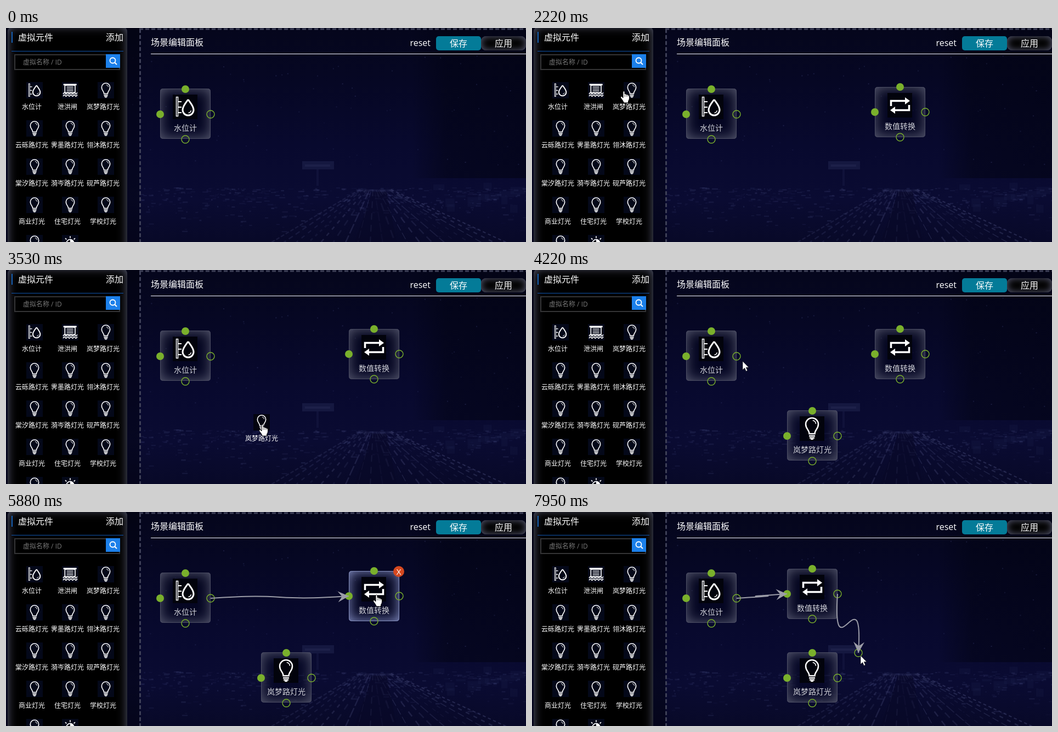
Write an HTML page with a canvas that moves like this. It is 948x392 px and loops after 8000 ms.

```html
<!DOCTYPE html>
<html lang="zh">
<head>
<meta charset="utf-8">
<style>
html, body { margin: 0; width: 100%; height: 100%; overflow: hidden; background: #05061f; }
canvas { display: block; }
</style>
</head>
<body>
<canvas id="stage" width="948" height="392"></canvas>
<script>
const W = 948, H = 392, LOOP = 8000;
const FONT = '"Open Sans", "Noto Sans CJK SC", "Noto Sans CJK", sans-serif';
const GREEN = '#7ab02c', GREY = '#9c9da8';
const screen = document.getElementById('stage').getContext('2d');
const backdrop = document.createElement('canvas');
backdrop.width = W;
backdrop.height = H;
let c = backdrop.getContext('2d');

function rect(x, y, w, h, fill) {
  c.fillStyle = fill;
  c.fillRect(x, y, w, h);
}

function text(s, x, cy, size, fill = '#fff', align = 'left') {
  c.font = `${size}px ${FONT}`;
  c.fillStyle = fill;
  c.textAlign = align;
  c.fillText(s, x, cy + size * 0.37);
}

function line(width, color, ...pts) {
  c.beginPath();
  pts.forEach(([x, y], i) => i ? c.lineTo(x, y) : c.moveTo(x, y));
  c.lineWidth = width;
  c.strokeStyle = color;
  c.stroke();
}

function disc(x, y, r, fill) {
  c.beginPath();
  c.arc(x, y, r, 0, 7);
  c.fillStyle = fill;
  c.fill();
}

function ring(x, y, r, color, width = 1.4) {
  c.beginPath();
  c.arc(x, y, r, 0, 7);
  c.lineWidth = width;
  c.strokeStyle = color;
  c.stroke();
}

function poly(pts, fill) {
  c.beginPath();
  pts.forEach(p => c.lineTo(...p));
  c.closePath();
  c.fillStyle = fill;
  c.fill();
}

// Rounded box with a glow on the inside of its edge
function glowBox(x, y, w, h, r, fill, glow, blur) {
  c.save();
  c.beginPath();
  c.roundRect(x, y, w, h, r);
  c.fillStyle = fill;
  c.fill();
  c.clip();
  c.beginPath();
  c.rect(x - 60, y - 60, w + 120, h + 120);
  c.roundRect(x, y, w, h, r);
  c.shadowColor = glow;
  c.shadowBlur = blur;
  c.fillStyle = glow;
  c.fill('evenodd');
  c.restore();
}

// Icons live on a 45 x 45 grid
const icons = {
  water() {
    c.lineWidth = 1.5;
    c.strokeRect(6.5, 4.5, 3, 35);
    for (const y of [13, 23, 33]) line(2, '#fff', [10, y], [16, y]);
    c.beginPath();
    c.moveTo(28, 9);
    c.bezierCurveTo(32, 15, 38, 21, 38, 28);
    c.arc(28, 28, 10, 0, Math.PI);
    c.bezierCurveTo(18, 21, 24, 15, 28, 9);
    c.lineWidth = 3;
    c.stroke();
    c.beginPath();
    c.arc(28, 28, 5.5, 0.2, 1.5);
    c.lineWidth = 1.5;
    c.stroke();
  },
  gate() {
    rect(4, 5, 36, 4, '#fff');
    c.lineWidth = 2.5;
    c.strokeRect(8, 9, 28, 20);
    for (const y of [14, 19, 24]) line(2, '#fff', [13, y], [31, y]);
    for (const y of [31, 37]) {
      c.beginPath();
      for (let x = 3; x <= 42; x++) c.lineTo(x, y + 2 * Math.sin(x * 0.7));
      c.lineWidth = 2.5;
      c.stroke();
    }
  },
  bulb() {
    c.beginPath();
    c.moveTo(17.5, 32);
    c.bezierCurveTo(17.5, 25, 11, 23, 11, 14.5);
    c.arc(22.5, 14.5, 11.5, Math.PI, 0);
    c.bezierCurveTo(34, 23, 27.5, 25, 27.5, 32);
    c.closePath();
    c.lineWidth = 2.5;
    c.stroke();
    c.beginPath();
    c.arc(22.5, 14.5, 7, -1.4, -0.1);
    c.lineWidth = 1.5;
    c.stroke();
    line(2.5, '#fff', [17, 36], [28, 36]);
    line(2.5, '#fff', [18, 39.5], [27, 39.5]);
    rect(20, 41, 5, 2, '#fff');
  },
  swap() {
    line(3.5, '#fff', [6.5, 24], [6.5, 14.5], [34, 14.5]);
    line(3.5, '#fff', [39.5, 22], [39.5, 31.5], [12, 31.5]);
    poly([[32, 8], [41, 14.5], [32, 21]], '#fff');
    poly([[14, 25], [5, 31.5], [14, 38]], '#fff');
  },
  sun() {
    ring(22.5, 22.5, 10, '#fff', 2.5);
    c.beginPath();
    c.arc(22.5, 22.5, 10, -Math.PI / 2, Math.PI / 2);
    c.fill();
    for (let a = 0; a < 6.2; a += Math.PI / 4) {
      const u = Math.cos(a), v = Math.sin(a);
      line(2.5, '#fff', [22.5 + u * 14, 22.5 + v * 14], [22.5 + u * 19, 22.5 + v * 19]);
    }
  }
};

function icon(name, x, y, size, bg) {
  rect(x, y, size, size, bg);
  c.save();
  c.translate(x, y);
  c.scale(size / 45, size / 45);
  c.strokeStyle = c.fillStyle = '#fff';
  icons[name]();
  c.restore();
}

function drawScene() {
  let seed = 11;
  const rnd = () => (seed = seed * 16807 % 2147483647) / 2147483647;
  const sky = c.createLinearGradient(0, 0, 0, H);
  [[0, '#05061c'], [0.25, '#06072400'.slice(0, 7)], [0.55, '#08092e'], [0.8, '#0a0b32'], [1, '#080928']]
    .forEach(s => sky.addColorStop(...s));
  rect(0, 0, W, H, sky);
  const shade = c.createLinearGradient(740, 0, W, 0);
  shade.addColorStop(0, 'rgba(2,3,18,0)');
  shade.addColorStop(0.3, 'rgba(2,3,18,.5)');
  shade.addColorStop(1, 'rgba(2,3,18,.6)');
  rect(740, 0, 208, 275, shade);
  for (let i = 0; i < 70; i++) {
    rect(230 + rnd() * 718, 50 + rnd() * 200, 2, 2, `rgba(70,75,130,${0.1 + rnd() * 0.25})`);
  }
  rect(540, 244, 58, 15, '#151840');
  rect(545, 250, 46, 4, '#1d2049');
  rect(566, 259, 4, 30, '#10123a');
  // City lights along the horizon
  for (let i = 0; i < 420; i++) {
    const y = 292 + rnd() * rnd() * 95;
    rect(240 + rnd() * 708, y, 2 + rnd() * 9, 1 + rnd() * 2, `rgba(68,74,125,${0.06 + rnd() * 0.2})`);
  }
  // Streets running to the vanishing point
  for (let i = 0; i < 20; i++) {
    const far = 645 + i * 3, near = 480 + i * 23;
    c.setLineDash([5 + rnd() * 14, 3 + rnd() * 8]);
    line(1 + rnd() * 2, `rgba(92,97,145,${0.12 + rnd() * 0.22})`, [far, 296], [near, 395]);
  }
  c.setLineDash([]);
  poly([[668, 300], [694, 300], [712, 392], [636, 392]], 'rgba(8,9,38,.5)');
  for (let i = 0; i < 14; i++) {
    rect(770 + rnd() * 170, 282 + rnd() * 50, 8 + rnd() * 20, 4 + rnd() * 14, 'rgba(45,50,95,.13)');
  }
  rect(0, 0, 243, H, 'rgba(0,0,8,.4)');
}

function drawPanel() {
  glowBox(3, -3, 218, 460, 10, '#000', '#565970', 17);
  rect(10, 7, 2, 20, '#1560b4');
  text('虚拟元件', 22, 17.5, 16);
  text('添加', 182, 17.5, 16);
  rect(10, 42, 204, 1, '#0f55b0');
  c.lineWidth = 2;
  c.strokeStyle = '#343436';
  c.strokeRect(16, 49, 191, 27);
  text('虚拟名称 / ID', 31, 62.5, 12, '#777');
  rect(182, 48, 26, 25, '#1c80ea');
  ring(194.5, 59.5, 5, '#fff', 1.8);
  line(2, '#fff', [198, 63], [202, 67]);

  const labels = ['水位计', '泄洪闸', '岚梦路灯光', '云砾路灯光', '霁墨路灯光', '翎沐路灯光', '棠汐路灯光',
    '漪岑路灯光', '砚芦路灯光', '商业灯光', '住宅灯光', '学校灯光', '', ''];
  const special = { 0: 'water', 1: 'gate', 13: 'sun' };
  labels.forEach((label, i) => {
    const x = 47 + i % 3 * 65, y = 99 + Math.floor(i / 3) * 70;
    icon(special[i] || 'bulb', x - 10, y, 30, '#040819');
    text(label, x, y + 45.5, 12, '#fff', 'center');
  });
}

function drawHeader() {
  c.setLineDash([7, 4]);
  line(3, '#3d3f56', [243, 2], [W, 2]);
  line(3, '#3d3f56', [244.5, 2], [244.5, H]);
  c.setLineDash([]);
  text('场景编辑面板', 264, 26, 16);
  rect(264, 47, 684, 1, '#fff');
  text('reset', 736.5, 27, 16);
  c.beginPath();
  c.roundRect(784, 15, 82, 26, 5);
  c.fillStyle = '#047b98';
  c.fill();
  text('保存', 825, 28.5, 16, '#fff', 'center');
  glowBox(866, 15, 82, 26, 9, '#000', '#5b5d76', 14);
  text('应用', 907, 28.5, 16, '#fff', 'center');
}

function node(x, y, name, label, hover) {
  const top = Math.floor(y), py = Math.round(y);
  glowBox(x, top, 92, 92, 5, 'rgba(2,3,20,.35)', hover ? '#8b95cc' : '#5c5e74', 24);
  c.beginPath();
  c.roundRect(x + 0.5, top + 0.5, 91, 91, 5);
  c.lineWidth = 1;
  c.strokeStyle = hover ? '#8590bd' : '#4b4d62';
  c.stroke();
  icon(name, x + 23, top + 11, 45, '#02030c');
  text(label, x + 46, top + 71.5, 14, '#d3d4da', 'center');
  disc(x + 46, py, 7, GREEN);
  disc(x, py + 46, 7, GREEN);
  ring(x + 92, py + 46, 7, GREEN);
  ring(x + 46, py + 92, 7, GREEN);
  if (hover) {
    disc(x + 91, top + 1, 10, '#d5481f');
    text('X', x + 91, top + 1, 15, '#fff', 'center');
  }
}

// Bezier link with strong handles along its main axis
function link(x0, y0, x1, y1) {
  const dx = x1 - x0, dy = y1 - y0;
  const flat = Math.abs(dx) >= Math.abs(dy);
  const hx = (flat ? 150 : -10) * (dx < 0 ? -1 : 1);
  const hy = flat ? (dy > 0 ? 10 : -10) : 150 * Math.sign(dy);
  const at = (t, a, b, h) => {
    const u = 1 - t;
    return u * u * u * a + 3 * u * u * t * (a + h) + 3 * u * t * t * (b - h) + t * t * t * b;
  };
  c.beginPath();
  c.moveTo(x0, y0);
  c.bezierCurveTo(x0 + hx, y0 + hy, x1 - hx, y1 - hy, x1, y1);
  c.lineWidth = 2;
  c.strokeStyle = GREY;
  c.stroke();
  let t = 1, bx, by;
  do {
    t -= 0.01;
    bx = at(t, x0, x1, hx);
    by = at(t, y0, y1, hy);
  } while (t > 0.5 && Math.hypot(x1 - bx, y1 - by) < 20);
  c.save();
  c.translate(x1, y1);
  c.rotate(Math.atan2(y1 - by, x1 - bx));
  poly([[0, 0], [-20, -10], [-12.5, 0], [-20, 10]], GREY);
  c.restore();
}

function arrow(x, y) {
  c.save();
  c.translate(x, y);
  poly([[0, 0], [0, 16], [3.7, 12.6], [6.2, 18.4], [8.8, 17.3], [6.3, 11.6], [11.2, 11.6]], '#fff');
  c.lineWidth = 0.6;
  c.strokeStyle = '#000';
  c.stroke();
  c.restore();
}

function hand(x, y) {
  c.save();
  c.translate(x - 6, y);
  c.beginPath();
  c.moveTo(5, 13);
  c.lineTo(5, 2);
  c.quadraticCurveTo(6.5, -1, 8, 2);
  c.lineTo(8, 6);
  c.quadraticCurveTo(10, 4.8, 11, 7);
  c.quadraticCurveTo(13, 6, 14, 8);
  c.quadraticCurveTo(16.5, 7.5, 16.5, 10);
  c.lineTo(16.5, 14);
  c.quadraticCurveTo(16, 17, 14.5, 19);
  c.lineTo(14.5, 22);
  c.lineTo(6.5, 22);
  c.quadraticCurveTo(5, 18, 0.8, 13);
  c.quadraticCurveTo(0, 10, 2.5, 10.5);
  c.closePath();
  c.fillStyle = '#fff';
  c.fill();
  c.lineWidth = 0.9;
  c.strokeStyle = '#000';
  c.stroke();
  for (const k of [8, 11, 14]) line(0.7, '#222', [k, 7], [k, 11]);
  c.restore();
}

function ghost(p, name, label) {
  const x = Math.round(p.x), y = Math.round(p.y);
  icon(name, x - 16, y - 18, 30, '#03040f');
  text(label, x - 1, y + 27, 12, '#fff', 'center');
}

const bursts = [[1280, 2220, 8], [2520, 2520, 1], [2800, 3530, 6], [3690, 3840, 2], [3980, 4220, 3],
  [4370, 4920, 5], [5050, 5880, 7], [6320, 6700, 4], [6850, 7120, 3], [7500, 7500, 1], [7800, 7950, 2]];

function hold(t) {
  let held = 0;
  for (const [a, b, n] of bursts) {
    if (t < a) break;
    const gaps = n - 1 || 1;
    const k = b > a ? Math.min(gaps, Math.floor((t - a) * gaps / (b - a) + 1e-6)) : 0;
    held = a + k * (b - a) / gaps;
  }
  return held;
}

const pointerKeys = [
  [1280, 396, 313, hand], [1682, 668, 146, arrow], [2220, 167, 115, hand], [2520, 168, 115, hand],
  [2800, 190, 128, hand], [3530, 467, 282, hand], [3840, 503, 295, hand], [3980, 500, 290, arrow],
  [4220, 384, 167, arrow], [4920, 372, 151, hand], [5050, 385, 161, arrow], [5600, 629, 159, arrow],
  [5740, 660, 155, hand], [5880, 675, 151, hand], [6320, 650, 151, hand], [6700, 517, 151, hand],
  [6850, 540, 152, hand], [6990, 566, 160, arrow], [7120, 568, 154, arrow], [7500, 561, 153, arrow],
  [7800, 582, 217, arrow], [7950, 599, 263, arrow]
];

function pointerAt(t) {
  const i = pointerKeys.findLastIndex(k => k[0] <= t);
  if (i < 0) return null;
  const a = pointerKeys[i], b = pointerKeys[i + 1] || a;
  const f = b === a ? 0 : (t - a[0]) / (b[0] - a[0]);
  return { x: a[1] + (b[1] - a[1]) * f, y: a[2] + (b[2] - a[2]) * f, draw: a[3] };
}

function drag(x, y, p) {
  const ex = p.x - 4, ey = p.y - 5;
  ring(ex, ey, 7, GREEN);
  link(x, y, ex, ey);
}

function render(time) {
  const t = hold(time), p = pointerAt(t);
  c.drawImage(backdrop, 0, 0);
  node(281, 111.5, 'water', '水位计');
  if (t >= 3980) node(465, 257.5, 'bulb', '岚梦路灯光');

  let x = 625, y = 108;
  if (t >= 6320) {
    const f = Math.min(1, (t - 6320) / 380);
    x = t < 6700 ? Math.round(p.x - 52) : 465;
    y = Math.round(107 - 3 * f);
  }
  if (t >= 1682) node(x, y, 'swap', '数值转换', t >= 5740 && t < 6990);

  if (t >= 5600) link(373, 158, x, y + 46);
  else if (t >= 5050) drag(373, 158, p);
  if (t >= 7800) drag(557, 150, p);

  if (t >= 1280 && t < 1682) ghost(p, 'swap', '数值转换');
  if (t >= 2800 && t < 3980) ghost(p, 'bulb', '岚梦路灯光');
  if (p) p.draw(Math.round(p.x), Math.round(p.y));
}

drawScene();
drawPanel();
drawHeader();
c = screen;

const start = performance.now();
function tick() {
  render((performance.now() - start) % LOOP);
  requestAnimationFrame(tick);
}
tick();
</script>
</body>
</html>
```
